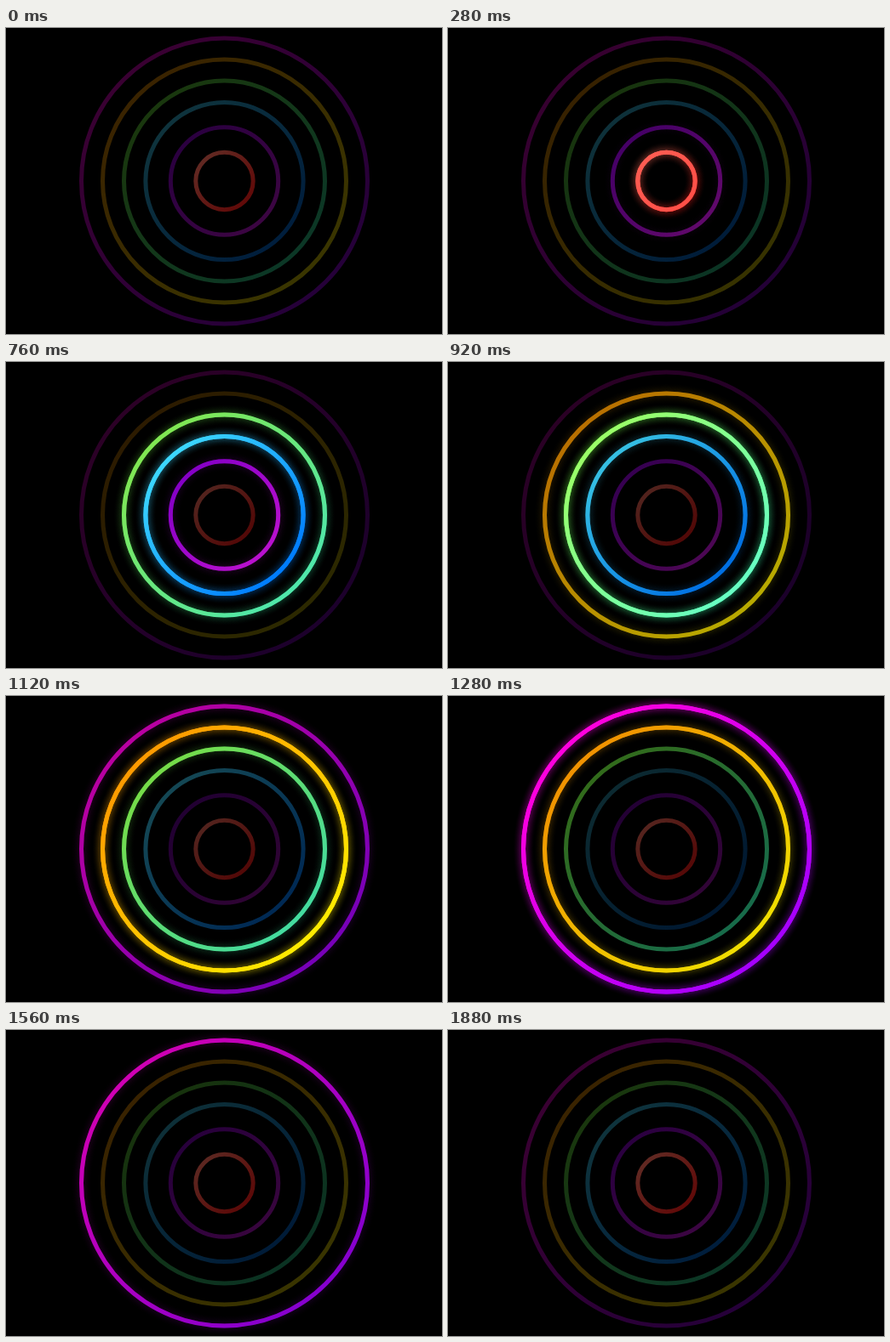
Write an HTML page with a canvas that moves like this. It is 512 px wide and 360 px high and loops after 1.92 s.

```html
<!DOCTYPE html>
<html lang="en">
<head>
<meta charset="utf-8">
<title>Pulsing rings</title>
<style>
  html, body { margin: 0; width: 100%; height: 100%; overflow: hidden; background: #000; }
  canvas { display: block; }
</style>
</head>
<body>
<canvas id="stage" width="512" height="360"></canvas>
<script>
const ctx = document.getElementById('stage').getContext('2d');
const LOOP = 1920, STEP = 40, STAGGER = 200, FIRST_PEAK = 280;
const CX = 256.5, CY = 180, WIDTH = 5, HALO = 23;

// Diagonal gradients: normal colours, and the tint at full glow where it differs
const rings = [
  { r: 33.7, cool: ['#ff6958', '#ff1c18'], hot: ['#ff5c52', '#ff5048'] },
  { r: 63.2, cool: ['#a500f5', '#e414ff'] },
  { r: 92.6, cool: ['#3cd7ff', '#007dff'] },
  { r: 118, cool: ['#6ef03c', '#32f0a5'], hot: ['#9bff69', '#69ffc3'] },
  { r: 143, cool: ['#ff9b00', '#ffeb00'] },
  { r: 168, cool: ['#ff00de', '#a500ff'] }
];

const clamp = x => Math.min(1, Math.max(0, x));
const smooth = x => x * x * (3 - 2 * x);

// Smooth rise to full light, then a cosine fall; u is ms from the peak
function pulse(u, fall) {
  return u < 0 ? smooth(clamp((u + 300) / 260)) : Math.cos(clamp(u / fall) * Math.PI / 2);
}

function gradient(r, [from, to]) {
  const d = r * Math.SQRT1_2;
  const paint = ctx.createLinearGradient(CX - d, CY - d, CX + d, CY + d);
  paint.addColorStop(0, from);
  paint.addColorStop(1, to);
  return paint;
}

function circle(r, width, alpha) {
  ctx.globalAlpha = alpha;
  ctx.lineWidth = width;
  ctx.beginPath();
  ctx.arc(CX, CY, r, 0, Math.PI * 2);
  ctx.stroke();
}

function drawRing({ r, cool, hot = cool }, index, t) {
  const sincePeak = t - FIRST_PEAK - index * STAGGER;
  const u = (sincePeak + LOOP * 1.5) % LOOP - LOOP / 2;
  const glow = pulse(u, 440) ** 2;
  const rest = 0.19 + 0.16 / (index + 1) ** 2 + 0.03 * Math.cos(t / LOOP * Math.PI * 2);

  ctx.strokeStyle = gradient(r, cool);
  // stacked strokes form a soft halo
  for (let w = HALO; w > WIDTH; w -= 2) circle(r, w, glow * 0.012 * (1 + (HALO - w) / 4));
  circle(r, WIDTH, Math.max(rest, pulse(u, 560)));
  ctx.strokeStyle = gradient(r, hot);
  circle(r, WIDTH, glow);
}

function draw(now) {
  const t = Math.floor(now % LOOP / STEP) * STEP;
  ctx.globalAlpha = 1;
  ctx.fillStyle = '#000';
  ctx.fillRect(0, 0, 512, 360);
  rings.forEach((ring, i) => drawRing(ring, i, t));
}

let start;
function tick(now) {
  start ??= now;
  draw(now - start);
  requestAnimationFrame(tick);
}
draw(0);
requestAnimationFrame(tick);
</script>
</body>
</html>
```
